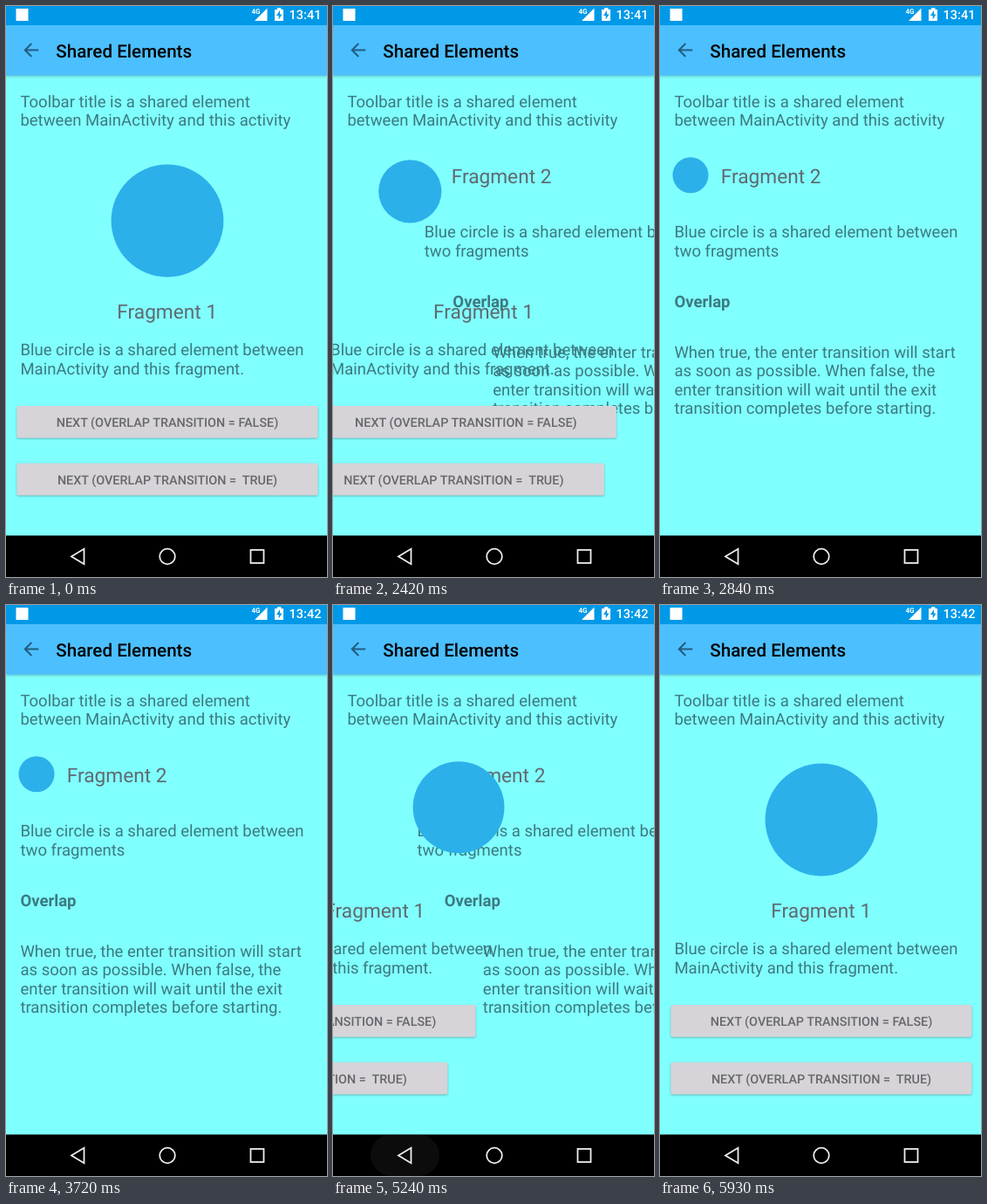
Write an HTML page that moves like this. It is 368x654 px and loops after 7.27 s.

```html
<!DOCTYPE html>
<html lang="en">
<head>
<meta charset="utf-8">
<title>Shared Elements</title>
<style>
html, body { margin: 0; width: 100%; height: 100%; overflow: hidden; background: #80ffff; }
svg { display: block; width: 368px; height: 654px; }
text { font: 18.55px Roboto, sans-serif; fill: #3b7a80; white-space: pre; text-rendering: geometricPrecision; }
.name { font-size: 22.7px; fill: #5f6a70; }
.bold { font-weight: 700; }
.btn rect { fill: #d6d4d9; filter: drop-shadow(0 1.3px 1px #0004); }
.btn text { font-size: 14.4px; font-weight: 500; fill: #68676b; text-anchor: middle; }
.bar { filter: drop-shadow(0 1px 1.5px #0004); }
.title { font-size: 20.6px; font-weight: 500; fill: #000; }
.status text { font-size: 14.5px; font-weight: 500; fill: #fff; }
.status .net { font-size: 8px; font-weight: 700; }
.nav { fill: none; stroke: #eee; stroke-width: 1.8; }
</style>
</head>
<body>
<svg viewBox="0 0 368 654">
  <rect width="368" height="654" fill="#80ffff"/>
  <text x="16.4" y="115.5">Toolbar title is a shared element</text>
  <text x="16.4" y="137">between MainActivity and this activity</text>

  <g class="second" data-lag="0"><text class="name" x="69.7" y="202.7">Fragment 2</text></g>
  <g class="second" data-lag="20">
    <text x="16.4" y="265">Blue circle is a shared element between</text>
    <text x="16.4" y="286.5">two fragments</text>
  </g>
  <g class="second" data-lag="45"><text class="bold" x="16.4" y="344.5">Overlap</text></g>
  <g class="second" data-lag="75">
    <text x="16.4" y="402.5">When true, the enter transition will start</text>
    <text x="16.4" y="424">as soon as possible. When false, the</text>
    <text x="16.4" y="445.5">enter transition will wait until the exit</text>
    <text x="16.4" y="467">transition completes before starting.</text>
  </g>

  <g class="first" data-lag="0"><text class="name" x="127.3" y="358">Fragment 1</text></g>
  <g class="first" data-lag="23.5">
    <text x="16.4" y="400">Blue circle is a shared element between</text>
    <text x="16.4" y="421.5">MainActivity and this fragment.</text>
  </g>
  <g class="first btn" data-lag="58">
    <rect x="12.3" y="458" width="345.3" height="36.7" rx="2"/>
    <text x="185" y="482">NEXT (OVERLAP TRANSITION = FALSE)</text>
  </g>
  <g class="first btn" data-lag="87">
    <rect x="12.3" y="523.7" width="345.3" height="36.7" rx="2"/>
    <text x="185" y="547.5">NEXT (OVERLAP TRANSITION =  TRUE)</text>
  </g>
  <circle id="disc" fill="#2bb0ea"/>

  <rect class="bar" y="21" width="368" height="58.5" fill="#4cbfff"/>
  <path d="M37.3 50.5H22.3M29.3 43L21.8 50.5L29.3 58" fill="none" stroke="#235c80" stroke-width="2"/>
  <text class="title" x="57.3" y="58.5">Shared Elements</text>

  <g class="status" fill="#fff">
    <rect width="368" height="22" fill="#0099e8"/>
    <rect x="11.5" y="3" width="14" height="14"/>
    <text class="net" x="281.5" y="9">4G</text>
    <path d="M299.5 2.5V17H285ZM308 4H311V2.3H315.5V4H318V17H308Z"/>
    <path d="M314 5L310 11H312.7V15.5L316.5 9.5H314Z" fill="#0099e8"/>
    <text id="clock" x="324.6" y="15">13:41</text>
  </g>

  <rect y="606.5" width="368" height="48"/>
  <rect id="ripple" x="43" y="606.5" width="79" height="47.5" rx="23.7" fill="#333"/>
  <g class="nav">
    <path d="M75 630.5L89.5 621.8V639.2Z"/>
    <circle cx="185" cy="630.5" r="8.8"/>
    <rect x="280.5" y="623" width="15" height="15"/>
  </g>
  <circle id="touch" r="10" fill="#f0eef6" fill-opacity=".85" stroke="#c9c6d6" stroke-opacity=".6" stroke-width="3"/>
</svg>
<script>
const LOOP = 7270, WIDTH = 368, STEP = 86, TAP = 2160, BACK = 4980;
const id = name => document.getElementById(name);
const set = (el, attrs) => { for (const k in attrs) el.setAttribute(k, attrs[k]); };
const part = (t, start, length) => Math.min(1, Math.max(0, (t - start) / length));
const slideOut = p => WIDTH * p * p;
const slideIn = p => slideOut(1 - p);
const ease = p => (1 - Math.cos(Math.PI * p)) / 2;
const mix = (a, b, p) => a + (b - a) * p;

function slide(name, offset) {
  for (const el of document.querySelectorAll(name))
    set(el, { transform: `translate(${offset(+el.dataset.lag)})` });
}

function draw(now) {
  const time = now % LOOP, back = time >= 4000;
  const base = back ? BACK : TAP;
  const t = base + STEP * Math.floor((time - base + 8) / STEP);

  slide('.first', lag => back
    ? -slideIn(part(t, 5043 + lag, 500))
    : -slideOut(part(t, 2327 - lag, 500)));
  slide('.second', lag => back
    ? slideOut(part(t, 5118 - lag, 300))
    : slideIn(part(t, 2245 + lag, 300)));

  const p = back ? 1 - ease(part(t, 5043, 300)) : ease(part(t, 2240, 300));
  set(id('disc'), { cx: mix(185, 35, p), cy: mix(246, 193.7, p), r: mix(64.4, 20.5, p) });

  const pressed = time >= base && time < base + 80;
  set(id('touch'), { cx: back ? 83 : 212, cy: back ? 643.5 : 556, opacity: +pressed });
  set(id('ripple'), { opacity: time < BACK ? 0 : 1 - part(t, BACK, 344) });
  id('clock').textContent = time < 3720 ? '13:41' : '13:42';
}

const start = performance.now();
function tick() {
  draw(performance.now() - start);
  requestAnimationFrame(tick);
}
tick();
</script>
</body>
</html>
```
